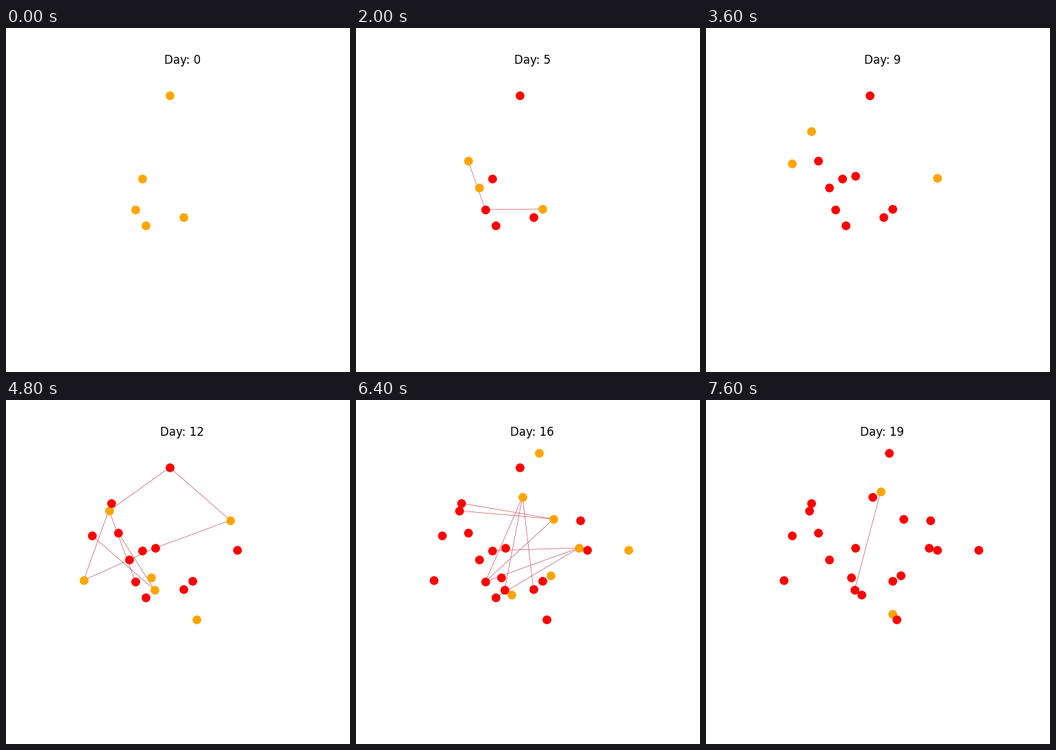
Recreate the animation shown at these times as a matplotlib script. Size 500x500 px, loop 8 s.

```python
import math

import matplotlib.pyplot as plt
from matplotlib.animation import FuncAnimation
from matplotlib.collections import LineCollection

SIZE, DPI = 500, 100
DAYS, STEP_MS = 20, 400

# Homes of the people infected on each day
WAVES = {
    0: [(238, 98), (198, 219), (188, 264), (203, 287), (258, 275)],
    4: [(179, 232)],
    5: [(163, 193), (271, 263)],
    6: [(217, 215)],
    7: [(153, 150)],
    8: [(125, 197), (336, 218)],
    10: [(277, 319)],
    11: [(211, 258)],
    12: [(150, 161), (216, 276), (113, 262), (326, 175)],
    13: [(226, 283)],
    14: [(266, 77), (283, 255)],
    15: [(396, 218)],
    16: [(242, 141), (287, 173), (324, 215)],
    17: [(271, 311)],
    19: [(254, 133)],
}


def onset(day):
    """First day of symptoms; incubation is longer in the second week."""
    return day + (4 if 8 <= day < 16 else 3)


def sick_on(day):
    people = [(home, onset(start)) for start, wave in WAVES.items()
              for home in wave]
    return [home for i, (home, first) in enumerate(people)
            if first <= day < first + 14 + i % 3]


def exposed_on(day):
    return [home for start, wave in WAVES.items()
            if start <= day < onset(start) for home in wave]


def contacts_on(day):
    """Link each newcomer to sick people about one day's trip away."""
    wave, sick = WAVES.get(day, []), sick_on(day)
    trip = 55 + 5 * day
    count = min(len(wave), (day + 1) // 5)
    links = []
    for home in wave:
        by_trip = sorted(sick, key=lambda p: abs(math.dist(p, home) - trip))
        links += [(other, home) for other in by_trip[:count]]
    return links


fig, ax = plt.subplots(figsize=(SIZE / DPI, SIZE / DPI), dpi=DPI,
                       facecolor="white")
# One data unit is one pixel, measured from the top left of the figure
box = ax.get_position()
ax.set(xlim=(box.x0 * SIZE, box.x1 * SIZE),
       ylim=((1 - box.y0) * SIZE, (1 - box.y1) * SIZE))
ax.axis("off")

title = ax.set_title("", fontsize=12, family="DejaVu Sans")
links = ax.add_collection(
    LineCollection([], colors="#c8505f", linewidths=0.5, zorder=1))


def dots(color, zorder):
    return ax.scatter([], [], s=84, c=color, linewidths=0, zorder=zorder)


exposed = dots("orange", 2)
sick = dots("red", 3)


def show(layer, homes):
    layer.set_visible(bool(homes))
    if homes:
        layer.set_offsets(homes)


def draw(day):
    show(exposed, exposed_on(day))
    show(sick, sick_on(day))
    links.set_segments(contacts_on(day))
    title.set_text(f"Day: {day}")
    return exposed, sick, links, title


anim = FuncAnimation(fig, draw, frames=DAYS, interval=STEP_MS,
                     init_func=lambda: draw(0), repeat=True, repeat_delay=0)
plt.show()
```
